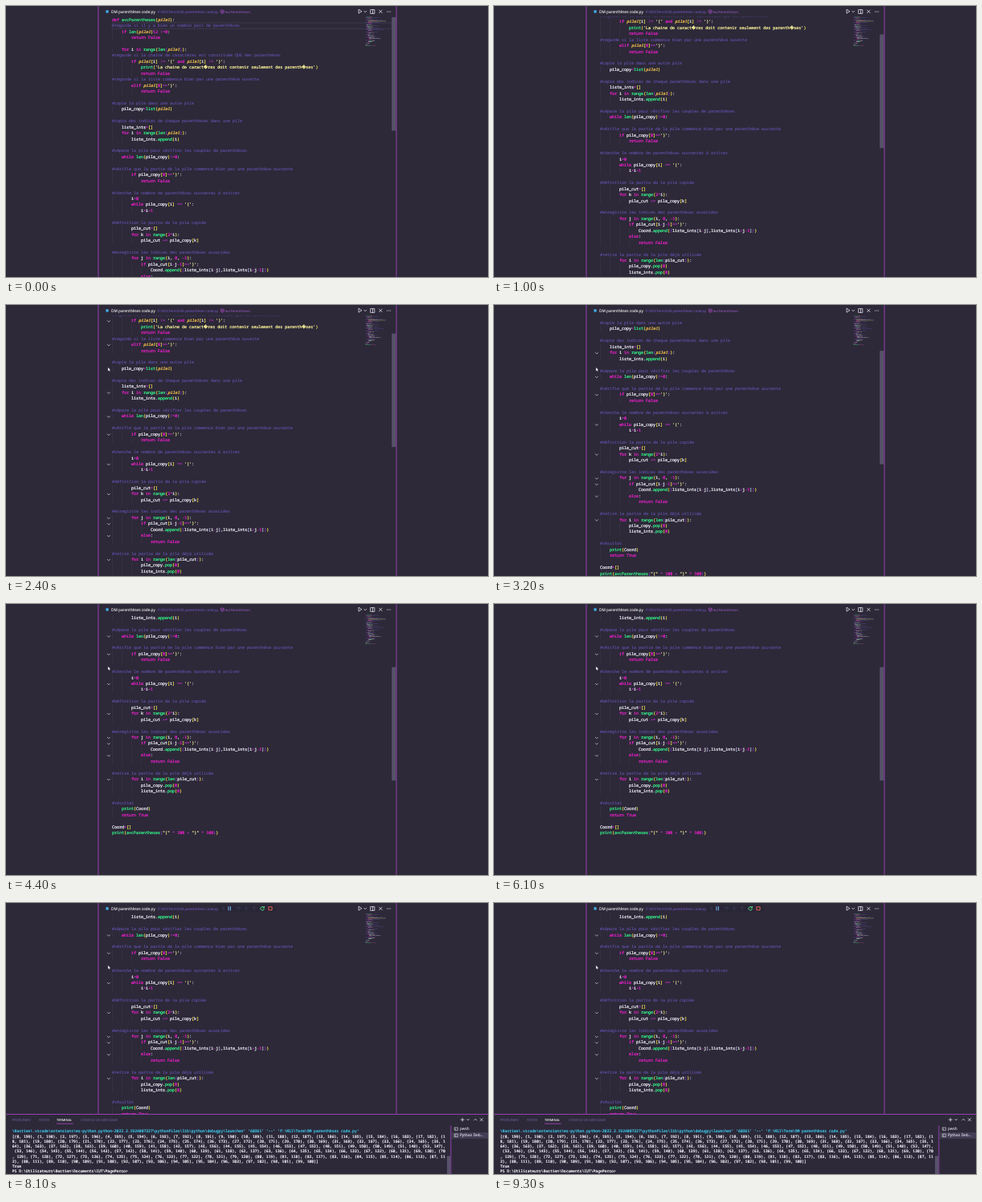
Recreate the animation shown at these times as an HTML page. Size 600x338 px, loop 9.4 s.

```html
<!DOCTYPE html>
<html lang="fr">
<head>
<meta charset="utf-8">
<title>Éditeur et terminal</title>
<style>
  html, body { margin: 0; width: 100%; height: 100%; overflow: hidden; background: #2d2939; }
  svg { display: block; width: 600px; height: 338px; }
  text { white-space: pre; text-rendering: geometricPrecision; }
  text, tspan { fill: currentColor; stroke: currentColor; }
  .mono { font-family: "Noto Sans Mono", "DejaVu Sans Mono", monospace; stroke-width: 0.22px; }
  .ui { font-family: "Open Sans", "Noto Sans", sans-serif; stroke-width: 0.08px; }
  .soft { stroke-width: 0.12px; }
  .line { fill: none; stroke-linecap: round; stroke-linejoin: round; }
</style>
</head>
<body>
<svg id="stage" viewBox="0 0 600 338" xmlns="http://www.w3.org/2000/svg">
  <defs><clipPath id="view"><rect x="115" y="13.5" width="371" height="325"/></clipPath></defs>
</svg>
<script>
const LOOP = 9400, PITCH = 7.44, NOTCH = 24.73, LEFT = 132, CHAR = 3;
const BG = '#2d2939', EDGE = '#9440b0', TEXT = '#f6f5fc';
const COLORS = {
  comment: '#6452ac', string: '#fff79a', keyword: '#ee1fcb', value: '#ee1fcb',
  call: '#35f58a', param: '#ffc94a', op: '#a02fa8', name: TEXT
};
const BRACKETS = ['#fbe850', '#8440b8', '#c4c0ee'];

const SOURCE = `def avcParentheses(pile1):
#regarde si il y a bien un nombre pair de parenthèses
    if len(pile1)%2 !=0:
        return False

    for i in range(len(pile1)):
#regarde si la chaine de caractères est constituée QUE des parenthèses
        if pile1[i] != '(' and pile1[i] != ')':
            print('La chaine de caract\uFFFDres doit contenir seulement des parenth\uFFFDses')
            return False
#regarde si la liste commence bien par une parenthèse ouverte
        elif pile1[0]==')':
            return False

#copie la pile dans une autre pile
    pile_copy=list(pile1)

#copie des indices de chaque parenthèses dans une pile
    liste_ints=[]
    for i in range(len(pile1)):
        liste_ints.append(i)

#sépare la pile pour vérifier les couples de parenthèses
    while len(pile_copy)!=0:

#vérifie que la partie de la pile commence bien par une parenthèse ouvrante
        if pile_copy[0]==')':
            return False

#cherche le nombre de parenthèses ouvrantes à arriver
        i=0
        while pile_copy[i] == '(':
            i=i+1

#définition la partie de la pile copiée
        pile_cut=[]
        for k in range(2*i):
            pile_cut += pile_copy[k]

#enregistre les indices des parenthèses associées
        for j in range(i, 0, -1):
            if pile_cut[i-j-1]==')':
                Coord.append((liste_ints[i-j],liste_ints[i+j-1]))
            else:
                return False

#retire la partie de la pile déjà utilisée
        for i in range(len(pile_cut)):
            pile_copy.pop(0)
            liste_ints.pop(0)

#résultat
    print(Coord)
    return True

Coord=[]
print(avcParentheses("(" * 100 + ")" * 100))`.split('\n');

function add(parent, tag, attrs) {
  const el = document.createElementNS('http://www.w3.org/2000/svg', tag);
  for (const k in attrs) el.setAttribute(k, attrs[k]);
  return parent.appendChild(el);
}
const group = (parent, attrs) => add(parent, 'g', attrs);
const rect = (parent, x, y, width, height, fill) => add(parent, 'rect', { x, y, width, height, fill });
const path = (parent, d, stroke, w = 0.7) =>
  add(parent, 'path', { d, stroke, 'stroke-width': w, class: 'line' });

// parts: a string, or a list of [string, colour, extra attributes]
function label(parent, cls, x, y, size, color, parts) {
  const el = add(parent, 'text', { class: cls, x, y, 'font-size': size, color });
  if (typeof parts === 'string') el.textContent = parts;
  else for (const [str, tint, extra] of parts)
    add(el, 'tspan', { color: tint, ...extra }).textContent = str;
  return el;
}

function highlight(line) {
  const rule = /(?<comment>#.*)|(?<string>"[^"]*"|'[^']*')|(?<keyword>\b(?:def|if|elif|else|for|in|while|and|return)\b)|(?<value>\b(?:False|True|\d+)\b)|(?<param>\bpile1\b)|(?<call>\w+(?=\())|(?<bracket>[()\[\]])|(?<op>[-+*%=!]+)|(?<name>\w+|\s+|.)/g;
  const out = [];
  let depth = 0;
  for (const m of line.matchAll(rule)) {
    const kind = Object.keys(m.groups).find(k => m.groups[k] !== undefined);
    if (kind === 'bracket') {
      const open = '(['.includes(m[0]);
      if (!open) depth--;
      out.push([m[0], BRACKETS[depth % 3]]);
      if (open) depth++;
    } else if (kind === 'string') {
      for (const s of m[0].split(/(\uFFFD)/))
        out.push([s, COLORS.string, s === '\uFFFD' ? { 'font-family': 'DejaVu Sans, sans-serif' } : {}]);
    } else {
      out.push([m[0], COLORS[kind], kind === 'param' ? { 'font-style': 'italic' } : {}]);
    }
  }
  return out;
}

const stage = document.getElementById('stage');
rect(stage, 0, 0, 600, 338, BG);

// Code
const view = group(stage, { 'clip-path': 'url(#view)' });
const code = group(view, {});
add(code, 'rect', { x: 132, y: 21, width: 348, height: 7.2, fill: 'none', stroke: '#46415a', 'stroke-width': 0.6 });
const folds = group(code, {});
const mini = group(stage, { opacity: 0.75 });
SOURCE.forEach((line, n) => {
  if (!line) return;
  const mid = 17.1 + n * PITCH, indent = line.search(/\S/);
  for (let c = 0; c < indent; c += 4)
    rect(code, LEFT + c * CHAR, mid - PITCH / 2, 0.4, PITCH, '#423e52');
  const parts = highlight(line);
  label(code, line[0] === '#' ? 'mono soft' : 'mono', LEFT, mid + 1.7, 5, TEXT, parts);
  if (line.endsWith(':'))
    path(folds, `M126.2 ${mid - 0.1}l1.6 1.6l1.6 -1.6`, '#d8d6e2');
  let x = 447.5;
  for (const [str, color] of parts) {
    const w = str.length * 0.3;
    if (str.trim()) rect(mini, x, 13.7 + n * 0.63, w, 0.42, color);
    x += w;
  }
});
const thumb = rect(stage, 480.2, 14, 5.2, 141.5, '#57526a');
rect(stage, 114.4, 0, 1, 338, EDGE);
rect(stage, 485.5, 0, 1, 338, EDGE);

// Title bar
add(stage, 'circle', { cx: 126, cy: 6.9, r: 1.9, fill: '#3fa9e0' });
label(stage, 'ui', 131, 8.7, 4.75, '#fff', 'DM parenthèses code.py');
label(stage, 'ui', 189, 8.6, 4.34, '#6c52b0', 'F:\\NSI\\Term\\DM parenthèses code.py');
path(stage, 'M269.3 4.8l2 1v2.4l-2 1l-2 -1v-2.4zM267.3 5.8l2 1l2 -1M269.3 6.8v2.4', '#b14fd0', 0.6);
label(stage, 'ui', 273, 8.6, 4.25, '#8e54b4', 'avcParentheses');
path(stage, 'M439 4.6v4.6l3.6 -2.3z', TEXT);
path(stage, 'M445.8 6.4l1.4 1.4l1.4 -1.4', TEXT);
path(stage, 'M454 4.6h4.8v4.8h-4.8zM456.4 4.6v4.8', TEXT);
path(stage, 'M464.5 5.1l3.6 3.6m0 -3.6l-3.6 3.6', TEXT);
for (const x of [474.4, 476.4, 478.4]) add(stage, 'circle', { cx: x, cy: 7, r: 0.55, fill: TEXT });

// Debug toolbar
const debug = group(stage, {});
rect(debug, 264.5, 2.6, 71, 8.8, '#292637');
for (let i = 0; i < 6; i++)
  add(debug, 'circle', { cx: 270 + i % 2 * 1.5, cy: 5.2 + (i >> 1) * 1.5, r: 0.4, fill: '#5d586e' });
const pause = path(debug, 'M277 4.6v4.4M279.4 4.6v4.4', '#3c4560', 1);
path(debug, 'M286.6 7a2.5 2.5 0 0 1 4.6 -0.6m0.2 -1.6v1.8h-1.8M289 9h0.1' +
  'M299 4.4v3m-1.5 -1.2l1.5 1.5l1.5 -1.5M299 9.2h0.1' +
  'M309 7.7v-3.1m-1.5 1.4l1.5 -1.5l1.5 1.5M309 9.2h0.1', '#3c4560');
path(debug, 'M321 5.4a2.3 2.3 0 1 0 0.4 2.2M321.4 4.3v1.7h-1.7', '#58e888', 0.9);
path(debug, 'M327.2 4.9h3.9v3.9h-3.9z', '#f46a50', 0.9);

// Terminal panel
const panel = group(stage, {});
rect(panel, 0, 263, 600, 75, BG);
rect(panel, 0, 263, 600, 1, EDGE);
[[8, 'PROBLÈMES'], [41, 'SORTIE'], [63, 'TERMINAL'], [93, 'CONSOLE DE DÉBOGAGE']].forEach(([x, str], i) =>
  label(panel, 'ui', x, 272, 3.95, i === 2 ? '#fff' : '#6b5a98', str));
rect(panel, 63, 274.8, 20.5, 0.7, '#c04fd8');
path(panel, 'M566.2 270.3h4M568.2 268.3v4M573.8 269.7l1.3 1.3l1.3 -1.3M582.7 271l1.6 -1.6l1.6 1.6M590.3 268.7l3.2 3.2m0 -3.2l-3.2 3.2', TEXT);
rect(panel, 553.3, 277.5, 1, 60.5, EDGE);
rect(panel, 554.3, 286.2, 45.7, 7.6, '#423d54');
[[282, 'pwsh'], [290, 'Python Deb...']].forEach(([y, str]) => {
  path(panel, `M558.6 ${y - 2}h3.8v3.6h-3.8zM559.5 ${y - 0.9}l0.8 0.7l-0.8 0.7`, TEXT, 0.55);
  label(panel, 'ui', 565, y + 1.4, 4.7, TEXT, str);
});

const COLS = 191, CYAN = '#3cc8ea';
const pairs = '[' + Array.from({ length: 100 }, (_, i) => `(${i}, ${199 - i})`).join(', ') + ']';
const wrap = from => {
  const rows = [];
  for (let i = from; i < pairs.length; i += COLS) rows.push(pairs.slice(i, i + COLS));
  return rows;
};
const home = 'Utilisateurs\\Bastien\\Documents\\IUT\\PagePerso';
const prompt = `PS D:\\${home}>`;
const launch = [
  [prompt + '  d:; ', TEXT], ['cd ', '#fff27a'], [`'d:\\${home}'`, CYAN], ['; & ', TEXT],
  ["'C:\\Users\\Bastien\\AppData\\Local\\Programs\\Python\\Python39\\python.exe' 'c:\\Users", CYAN]
];
const launchEnd = [[
  "\\Bastien\\.vscode\\extensions\\ms-python.python-2022.2.1924087327\\pythonFiles\\lib\\python\\debugpy\\launcher' '60361' '--' 'f:\\NSI\\Term\\DM parenthèses code.py'",
  CYAN
]];
function screen(rows) {
  const g = group(panel, {});
  rows.forEach((row, i) => label(g, 'mono', 7.8, 286.3 + i * 6.24, 4.71, TEXT, row));
  return g;
}
const before = screen([...wrap(298), 'True', launch, launchEnd]);
const after = screen([launchEnd, ...wrap(0), 'True', prompt]);
rect(after, 549, 315.5, 4.3, 22.5, '#57526a');

const mouse = add(stage, 'path', {
  d: 'M126.9 77.8v4.6l1.1 -0.9l0.8 1.6l0.7 -0.4l-0.7 -1.5h1.4z',
  fill: '#fff', stroke: '#15131c', 'stroke-width': 0.2
});

// Timeline
const NOTCHES = [500, 900, 2600, 2900, 3400, 4400];
const HOVER = 1200, RUN = 7000, DONE = 8000;
const show = (el, on) => el.setAttribute('visibility', on ? 'inherit' : 'hidden');

function draw(now) {
  const t = now % LOOP;
  const scroll = NOTCHES.filter(at => t >= at).length * NOTCH;
  const running = t >= RUN, done = t >= DONE;
  code.setAttribute('transform', `translate(0 ${-scroll})`);
  thumb.setAttribute('y', running ? 69.6 : 14 + scroll * 0.436);
  thumb.setAttribute('height', running ? 93 : 141.5);
  show(thumb, !done);
  show(folds, t >= HOVER);
  show(mouse, t >= HOVER);
  show(debug, running);
  show(panel, running);
  show(before, running && !done);
  show(after, done);
  pause.setAttribute('stroke', done ? '#78bcf6' : '#3c4560');
}
const start = performance.now();
function tick() {
  draw(performance.now() - start);
  requestAnimationFrame(tick);
}
tick();
</script>
</body>
</html>
```
